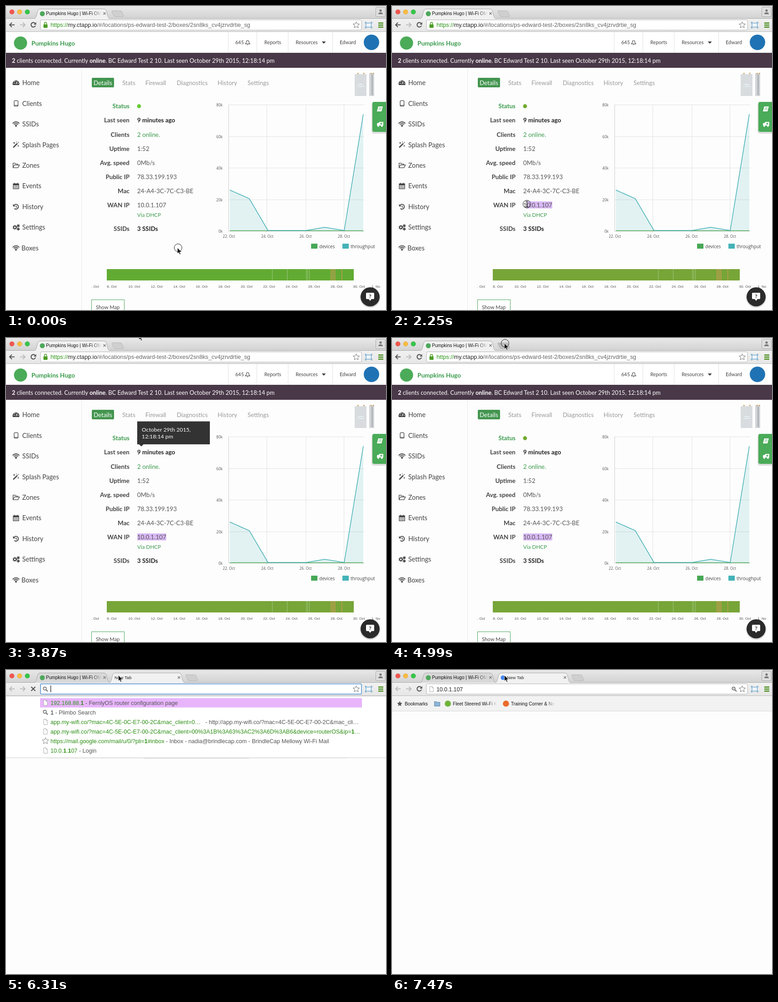
An HTML page that plays this animation: 837 px wide and 669 px high, repeating every 8000 ms.

```html
<!DOCTYPE html>
<html lang="en">
<head>
<meta charset="utf-8">
<title>Browser walkthrough</title>
<style>
  html, body { margin: 0; width: 100%; height: 100%; overflow: hidden; background: #fdfdfd; }
  svg { display: block; width: 837px; height: 669px; }
  text { font-family: Lato, sans-serif; white-space: pre; }
  .ui { font-family: "Liberation Sans", Arial, sans-serif; }
  .chart { font-family: "Open Sans", sans-serif; }
  .bold { font-weight: 700; }
  .end { text-anchor: end; }
  .mid { text-anchor: middle; }
</style>
</head>
<body>
<svg id="stage" viewBox="0 0 837 669"></svg>
<script>
const LOOP = 8000;
const stage = document.getElementById('stage');

// Drawing helpers
const text = (x, y, s, size, fill = '#444', cls = '') =>
  `<text x="${x}" y="${y}" font-size="${size}" fill="${fill}" class="${cls}">${s}</text>`;
const rect = (x, y, w, h, fill, more = '') =>
  `<rect x="${x}" y="${y}" width="${w}" height="${h}" fill="${fill}" ${more}/>`;
const disc = (x, y, r, fill, more = '') => `<circle cx="${x}" cy="${y}" r="${r}" fill="${fill}" ${more}/>`;
const line = (d, stroke, width = 1, fill = 'none') =>
  `<path d="${d}" stroke="${stroke}" stroke-width="${width}" fill="${fill}"/>`;
const shape = (d, fill) => `<path d="${d}" fill="${fill}"/>`;
const during = (span, content) => `<g data-on="${span}">${content}</g>`;
const move = (x, y, content) => `<g transform="translate(${x} ${y})">${content}</g>`;

let fades = 0;
const fadeText = (x, y, s, size, end) => {
  const id = 'fade' + fades++;
  return `<linearGradient id="${id}" gradientUnits="userSpaceOnUse" x1="${end - 20}" x2="${end}">
    <stop stop-color="#111"/><stop offset="1" stop-color="#111" stop-opacity="0"/></linearGradient>` +
    text(x, y, s, size, `url(#${id})`, 'ui');
};
const gradient = (id, top, bottom) => `<linearGradient id="${id}" x2="0" y2="1">
  <stop stop-color="${top}"/><stop offset="1" stop-color="${bottom}"/></linearGradient>`;

// Icons, centred on 0,0
const star = (r, fill, stroke) => {
  const pts = Array.from({ length: 10 }, (_, i) => {
    const a = i * Math.PI / 5, d = i % 2 ? r * .45 : r;
    return `${(d * Math.sin(a)).toFixed(2)} ${(-d * Math.cos(a)).toFixed(2)}`;
  });
  return line(`M${pts.join('L')}Z`, stroke, 1, fill);
};
const wifi = [3, 6, 9].map(r => line(`M${-r * .8} ${5 - r * .7}A${r} ${r} 0 0 1 ${r * .8} ${5 - r * .7}`, '#444', 1.8)).join('') + disc(0, 4.5, 1.6, '#444');
const gear = (x, y, r) => disc(x, y, r, 'none', 'stroke="#444" stroke-width="2"') +
  disc(x, y, r + 1.4, 'none', 'stroke="#444" stroke-width="1.5" stroke-dasharray="1.7 1.7"');
const doc = line('M-4 -6H1L4 -3V6H-4ZM1 -6V-3H4', '#aaa', 1, '#fff');
const glass = disc(-1.5, -1.2, 3.3, 'none', 'stroke="#666" stroke-width="1.5"') + line('M1 1.4L5 5', '#666', 2);
const close = line('M-2.5 -2.5L2.5 2.5M2.5 -2.5L-2.5 2.5', '#777', 1.3);
const icons = {
  gauge: shape('M-7 5A7.5 7.5 0 1 1 7 5Z', '#444') + line('M0 3L2.5 -3', '#fff', 1.4) +
    disc(-4, 1, 1, '#fff') + disc(-2.5, -3, 1, '#fff') + disc(4.5, 1, 1, '#fff'),
  tablet: rect(-4, -6, 8.5, 12, 'none', 'rx="1.5" stroke="#444" stroke-width="1.3"') + line('M-4 4H4', '#444'),
  wifi,
  wand: line('M-6 6L3 -3', '#444', 2.6) + line('M-4 -6V-2M-6 -4H-2M1 -7V-5M6 -6L4 -4M5 1V4M3.5 2.5H6.5', '#444', 1.1),
  folder: line('M-6.5 4V-5H-2L-.5 -3H4V-1M-6.5 5L-3.5 -1H7.5L4.5 5Z', '#444', 1.3),
  calendar: rect(-6, -5, 12, 11, 'none', 'stroke="#444" stroke-width="1.4"') +
    line('M-6 -3H6', '#444', 3) + line('M-6 2H6M-2 -2V6M2 -2V6', '#444', .9) + line('M-3 -7V-4M3 -7V-4', '#444', 1.8),
  history: line('M-4 -3.5A5.3 5.3 0 1 1 -3.5 4', '#444', 1.8) + shape('M-6.5 -6V-.8H-1.4Z', '#444') + line('M.3 -3V1H3', '#444', 1.3),
  gears: gear(-2.5, 0, 2.8) + gear(5, -3.5, 1.3) + gear(5, 3.7, 1.3)
};

// Browser frame
const tab = (x, fill) =>
  line(`M${x} 27.5q2.5 -.5 3.5 -4l3.5 -13q1.2 -4 5 -4H${x + 153}q3.8 0 5 4l3.5 13q1 3.5 3.5 4V50H${x}Z`, '#aaa', 1, fill);
const addButton = (x, fill) =>
  line(`M${x + 3} 10.5h17q3 0 4 3l3 8q0 2 -3 2h-15q-3 0 -4 -3l-4 -8q0 -2 2 -2Z`, '#b8b8b8', 1, fill);
const oldTab = fill => tab(63, fill) + disc(80, 17, 5.5, '#4fa85c') +
  fadeText(88, 20, 'Pumpkins Hugo | Wi-Fi OMD', 10.1, 210) + move(217, 16.5, close);
const arrowLeft = color => line('M19 41.5H8.5M13 36.5L8 41.5L13 46.5', color, 2);
const arrowRight = color => line('M31 41.5H41.5M37 36.5L42 41.5L37 46.5', color, 2);
const reload = line('M64 38A5 5 0 1 0 65 43', '#555', 2.1) + shape('M66.5 35.5V41H61Z', '#555');

const strip = rect(0, 0, 837, 28, 'url(#strip)') +
  [['#f0574f', '#dc4a42', 13], ['#fbbc40', '#e2a437', 30], ['#36c649', '#2bac3a', 47]]
    .map(([fill, rim, x]) => disc(x, 13, 5, fill, `stroke="${rim}" stroke-width=".8"`)).join('') +
  rect(814.5, 2.5, 21, 21, '#dedede', 'rx="2" stroke="#aaa"') + disc(825, 10, 2.6, '#777') + shape('M820 18q0 -4 5 -4t5 4Z', '#777') +
  line('M0 27.5H837', '#aaa');

const tabs = during('0-5260', oldTab('#f1f1f1') + addButton(232, '#cfcfcf') +
    during('4350-5260', addButton(232, '#e6e6e6')) + during('4990-5050', addButton(232, '#bdbdbd'))) +
  during('5260-8000', oldTab('#d8d8d8') + addButton(395, '#cfcfcf') +
    `<g id="newTab">${tab(228, '#f1f1f1')}${move(381, 16.5, close)}
    ${during('5260-7470', text(239, 20, 'New Tab', 9.7, '#222', 'ui'))}
    ${during('7470-8000', disc(244.5, 17, 5, '#4285f4') + text(253, 20, 'New Tab', 9.7, '#222', 'ui'))}</g>`);

const field = (stroke, width) => rect(76, 30.5, 707, 22.5, '#fff', `rx="2.5" stroke="${stroke}" stroke-width="${width}"`);
const address = (s, selectFrom, selectTo) => rect(selectFrom, 34, selectTo - selectFrom, 16, '#dcbafa') +
  move(87, 42, doc) + text(98, 46.5, s, 12.3, '#222', 'ui');
const toolbar = rect(0, 28, 837, 29, 'url(#toolbar)') + line('M0 56.5H837', '#b9b9b9') +
  during('0-5260', arrowLeft('#555') + arrowRight('#bbb') + reload + field('#b5b5b5', 1) +
    rect(82.5, 40.5, 9, 7.5, '#4a9c23', 'rx="1"') + line('M84.5 41V38.5a2.5 2.5 0 0 1 5 0V41', '#4a9c23', 1.5) +
    text(98, 46, '<tspan fill="#2c9417">https://</tspan><tspan fill="#222">my.ctapp.io</tspan>/#/locations/ps-edward-test-2/boxes/2sn8ks_cv4jzrvdrtie_sg', 12.75, '#666', 'ui')) +
  during('5260-8000', arrowLeft('#bbb') + arrowRight('#bbb')) +
  during('5260-7470', line('M55.5 37L64.5 46M64.5 37L55.5 46', '#555', 2.2)) +
  during('7470-8000', reload) +
  during('5260-7320', field('#76a8dc', 2)) +
  during('7320-8000', field('#b5b5b5', 1) + address('10.0.1.107', 0, 0) +
    move(754, 42, glass + line('M-3.2 -1.2H.2', '#666'))) +
  during('5260-6400', move(87, 42, glass)) +
  during('5260-5800', rect(98, 34, 1.2, 15, '#111')) + during('6100-6400', rect(98, 34, 1.2, 15, '#111')) +
  during('6400-6580', address('192.168.88.1', 104.8, 170)) +
  during('6580-7320', address('10.0.1.107', 111.7, 157)) +
  move(771.5, 42, star(7.5, '#fff', '#777')) +
  rect(793, 37.5, 11.5, 9, '#eef5fa', 'stroke="#5f9ecb" stroke-width="1.2"') +
  line('M791.5 38.5V35.5H794M803.5 35.5H806V38.5M806 45.5V48.5H803.5M794 48.5H791.5V45.5', '#5b93bd', 1.1) +
  line('M820 37.5H831M820 42H831M820 46.5H831', '#468c18', 2.4);

// Dashboard page
const menu = [['gauge', 'Home'], ['tablet', 'Clients'], ['wifi', 'SSIDs'], ['wand', 'Splash Pages'], ['folder', 'Zones'],
  ['calendar', 'Events'], ['history', 'History'], ['gears', 'Settings'], ['wifi', 'Boxes']]
  .map(([icon, label], i) => move(22, 169 + i * 45.45, icons[icon] + text(i === 8 ? 12 : 13.7, 5.2, label, 14.4))).join('');

const sections = rect(189, 158, 49, 21, '#43954f', 'rx="2"') +
  [[193, 'Details'], [256, 'Stats'], [307, 'Firewall'], [376, 'Diagnostics'], [466, 'History'], [532, 'Settings']]
    .map(([x, s], i) => text(x, 173.5, s, 13.4, i ? '#999' : '#fff')).join('');

const green = '#3a9a4c';
const details = [['Status', ''], ['Last seen', '9 minutes ago', '#222', 'bold'], ['Clients', '2 online.', green], ['Uptime', '1:52'],
  ['Avg. speed', '0Mb/s'], ['Public IP', '78.33.199.193'], ['Mac', '24-A4-3C-7C-C3-BE'], ['WAN IP', '10.0.1.107']]
  .map(([label, value, color = '#555', cls], i) => {
    const y = 225.3 + i * 31.1;
    return text(272, y, label, 13.5, i ? '#444' : green, 'end bold') + text(289, y, value, 13.4, color, cls);
  }).join('') + text(289, 463.5, 'Via DHCP', 11.7, green) +
  text(272, 495, 'SSIDs', 13.5, '#444', 'end bold') + text(289, 495, '3 SSIDs', 13.4, '#222', 'bold');

const curve = '493 405L536 424L577 494L661 494L702 487L745 494L787 238';
const chart = line('M490 217.5H789M490 287.5H789M490 356.5H789M490 426.5H789M574.5 217V495M660.5 217V495M744.5 217V495', '#e2e2e2') +
  line('M490.5 217V495.5H789M574.5 495V499M660.5 495V499M744.5 495V499', '#ccc') +
  `<path d="M${curve}V494H493Z" fill="#45b0b5" opacity=".14"/>` +
  line('M493 494.5H787', '#4fae5c', 1.4) + line('M' + curve, '#45b0b5', 1.5) +
  [80, 60, 40, 20, 0].map((n, i) => text(477, 221 + i * 69.5, n + 'k', 8.2, '#555', 'chart end')).join('') +
  [22, 24, 26, 28].map((n, i) => text(491 + i * 84.5, 510, n + '. Oct', 8.2, '#555', 'chart mid')).join('') +
  rect(672, 523, 14, 11, '#47a856') + text(690, 533, 'devices', 10, '#444', 'chart') +
  rect(741, 523, 14, 11, '#44b3b8') + text(759, 533, 'throughput', 10.1, '#444', 'chart');

const health = (span, dot, bar) => during(span, disc(293, 220.5, 4.4, dot) + rect(222, 579, 544, 25, bar));
const timeline = health('0-1540', '#66cc33', '#62ab33') + health('1540-8000', '#72aa2e', '#77a538') +
  [586, 619, 661, 664, 668].map(x => rect(x, 579, 1, 25, '#9cc77d')).join('') +
  [715, 718, 721, 724, 739].map(x => rect(x, 579, 1.4, 25, '#c99a55')).join('') +
  text(188, 620, '. Oct', 8, '#555', 'ui') + text(805, 620, '1. No', 8, '#555', 'ui') +
  Array.from({ length: 12 }, (_, i) => text(233 + i * 49.5, 620, 8 + 2 * i + '. Oct', 8, '#555', 'ui mid')).join('');

const header = rect(0, 57, 837, 46, '#fff') + disc(32, 81.5, 14.5, '#4bab58') +
  text(56, 87, 'Pumpkins Hugo', 13.6, green, 'bold') + line('M489.5 57V103M552.5 57V103M621.5 57V103M719.5 57V103', '#e0e0e0') +
  text(505, 84, '645', 10.9) + text(569, 84, 'Reports', 10.9) + text(638, 84, 'Resources', 10.9) + text(735, 84, 'Edward', 10.9) +
  line('M527.5 83.5q2 -1.5 2 -5q0 -2.5 2.7 -2.5t2.7 2.5q0 3.5 2 5ZM531 85.5h2.5', '#444', 1.1) +
  shape('M695.5 78H704.5L700 83Z', '#444') + disc(805, 80, 17, '#1f73b4') +
  rect(0, 103, 837, 33, '#493848') +
  text(13, 124.5, '<tspan class="bold">2</tspan> clients connected. Currently <tspan class="bold">online</tspan>. BC Edward Test 2 10. Last seen October 29th 2015, 12:18:14 pm', 12.8, '#fff');

const extras = rect(768, 150, 26, 48, '#d8dcdf') + shape('M773 178q8 -14 17 0Z', '#eef1f2') + line('M775 177q6 -5 12 0', '#9fc3cc') +
  rect(800, 148, 11, 50, '#d2d5d8') + rect(805, 151, 3, 45, '#aeb2b6') +
  [774, 787, 803, 808].map(x => rect(x, 147, 2.5, 3, '#c9a86a')).join('') +
  rect(805, 213, 36, 68, '#000', 'rx="5" opacity=".12"') + rect(807, 211, 34, 66, '#4aab58', 'rx="4"') +
  shape('M820 221H830L827 232H817Z', '#fff') + line('M821.5 224H827.5M820.5 227H826.5', '#4aab58') +
  rect(822, 255, 9, 8, '#fff') + shape('M817 263V259L819 257H822V263Z', '#fff') + disc(820, 264, 2, '#fff') + disc(828, 264, 2, '#fff') +
  line('M826.5 256.5V261.5M824 259H829', '#4aab58', 1.4) +
  rect(188.5, 646.5, 72, 40, '#fff', 'stroke="#4aa55a"') + text(198, 667, 'Show Map', 11.3) +
  disc(802, 642, 22, '#000', 'opacity=".15"') + disc(802, 640, 21, '#2b2b2b') +
  shape('M795 631H809q2 0 2 2V643q0 2 -2 2H805L802 649L799 645H795q-2 0 -2 -2V633q0 -2 2 -2Z', '#fff') +
  text(802, 642.5, '?', 12, '#2b2b2b', 'mid bold');

const tooltip = rect(289, 183.5, 160, 50.5, '#333') + shape('M293 234H303L298 238.5Z', '#333') +
  text(299, 206, 'October 29th 2015,', 12.3, '#fff') + text(299, 220.5, '12:18:14 pm', 12.3, '#fff');

const page = rect(0, 57, 837, 612, '#fdfdfd') + header + line('M166.5 136V669', '#e9e9e9') +
  '<rect id="selection" y="430" height="15.5" fill="#d9b9f6"/>' +
  menu + sections + timeline + details + chart + extras + during('3870-4200', tooltip);

// New tab page
const bookmarks = rect(0, 57, 837, 33, '#f2f2f2') + line('M0 90.5H837', '#dadada') +
  move(17, 74.5, star(5.2, '#555', '#555')) + text(28, 77.5, 'Bookmarks', 10.2, '#111', 'ui') +
  line('M93.5 69.5H98L99.5 71H105.5V79.5H93.5Z', '#5b87ad', 1, '#8fb5d6') +
  disc(123, 74, 6.8, '#6fb33a') + fadeText(134, 77.5, 'Fleet Steered Wi-Fi Kit', 10.2, 231) +
  disc(251, 74, 6.8, '#ea6a2c') + fadeText(262, 77.5, 'Training Corner &amp; Notes', 10.2, 359);

const bold = s => s.replace(/&/g, '&amp;').replace(/\*(.+?)\*/g, '<tspan class="bold">$1</tspan>');
const suggestion = ([icon, url, title], i) => move(87, 72 + i * 21.05, icon +
  text(11, 4.5, `<tspan fill="#2c8f14">${bold(url)}</tspan>${bold(title)}`, 12.55, '#555', 'ui'));
const app = 'app.my-wifi.co/?mac=4C-5E-0C-E7-00-2C&mac_client=0';
const outline = star(7.5, '#fff', '#888');
const router = [doc, '192.168.88.*1*', ' - FernlyOS router configuration page'];
const login = [doc, '10.0.*1*.*1*07', ' - Login'];
const client = [doc, app + '…', '\u00a0\u00a0 - http://app.my-wifi.co/?mac=4C-5E-0C-E7-00-2C&mac_cli…'];
const device = [doc, app + '0%3A1B%3A63%3AC2%3A6D%3AB6&device=routerOS&ip=*1*…', ''];
const mail = [outline, 'https://mail.google.com/mail/u/0/?pli=*1*#inbox', ' - Inbox - nadia@brindlecap.com - BrindleCap Mellowy Wi-Fi Mail'];
const search = s => [glass, '', `<tspan fill="#222">${s}</tspan> - Plimbo Search`];
const list = (span, rows) => during(span, rows.map(suggestion).join(''));
const typed = [doc, '*10*.0.1.107', ' - Login'];
const nearby = [doc, '*10*.0.0.1', ' - Login'];

const dropdown = rect(0, 57, 837, 136, '#fff') + line('M0 57.5H837', '#d4d4d4') +
  line('M0 193H837', '#dcdcdc', 1.5) + line('M90 194.5H750', '#ececec') + line('M303 194.5H535', '#d2d2d2') +
  rect(75, 62, 709, 20.5, '#e8b5fc') +
  list('6310-6580', [router, search('1'), client, device, mail, login]) +
  list('6580-6750', [typed, search('10'), client, mail, router, nearby]) +
  list('6750-7140', [typed, search('10'), client, router, mail, nearby]);

const blank = rect(0, 57, 837, 612, '#fdfdfd') + bookmarks + during('6310-7140', dropdown);

const pointer = `<g id="cursor">
  <path id="arrow" d="M-1.5 0V13L1.5 10.3L3.6 15L5.8 14L3.8 9.5H8Z" fill="#111" stroke="#fff" stroke-width=".8"/>
  <path id="beam" d="M-3 -6.5Q0 -6.5 0 -4.5Q0 -6.5 3 -6.5M0 -4.5V4.5M-3 6.5Q0 6.5 0 4.5Q0 6.5 3 6.5M-1.5 1.5H1.5" fill="none" stroke="#222" stroke-width="1.2"/>
  ${['0-90', '1370-2970', '4990-5050'].map(s => during(s, disc(0, 0, 8.5, 'none', 'stroke="#222"'))).join('')}</g>`;

stage.innerHTML = gradient('strip', '#e8e8e8', '#d2d2d2') + gradient('toolbar', '#f1f1f1', '#e6e6e6') +
  strip + tabs + toolbar + during('0-5260', page) + during('5260-8000', blank) + pointer;

// Motion: [time, x, y]
const path = [
  [0, 379, 532], [390, 378, 527], [480, 373, 505], [570, 364, 476], [660, 357, 457], [740, 352, 445], [830, 349, 439], [920, 348, 436],
  [1540, 340, 436], [1620, 329, 436], [1830, 321, 436], [1920, 312, 436], [2010, 304, 436], [2100, 298, 436],
  ...Array.from({ length: 8 }, (_, i) => [2250 + i * 77, 297 - i * 8 / 7, 436 + i * 3 / 7]),
  [3570, 291, 365], [3660, 294, 252], [3870, 294, -9], [3990, 290, -30],
  [4200, 266, -8], [4290, 257, 3], [4350, 251, 8], [4440, 249, 9.5], [4610, 249, 10.5], [4700, 249, 11.5]];
const tabDrop = [[0, 11], [5320, 4], [5500, 0]];
const at = (steps, t) => steps.findLast(s => s[0] <= t).slice(1);

// Caret stops inside the selectable address
const stops = [289];
for (const ch of '10.0.1.107') stops.push(stops.at(-1) + (ch === '.' ? 3.2 : 7.77));

const byId = id => document.getElementById(id);
const [cursor, arrow, beam, selection, newTab] = ['cursor', 'arrow', 'beam', 'selection', 'newTab'].map(byId);
const timed = [...stage.querySelectorAll('[data-on]')].map(el => [el, ...el.dataset.on.split('-').map(Number)]);
const show = (el, on) => el.setAttribute('display', on ? 'inline' : 'none');

function render(t) {
  for (const [el, from, to] of timed) show(el, t >= from && t < to);
  const [x, y] = at(path, t);
  cursor.setAttribute('transform', `translate(${x} ${y})`);
  const overText = t >= 740 && t < 3570;
  show(beam, overText);
  show(arrow, !overText);

  const dragX = t < 2790 ? x : stops[0];
  const left = stops.reduce((a, b) => Math.abs(b - dragX) < Math.abs(a - dragX) ? b : a);
  selection.setAttribute('x', left);
  selection.setAttribute('width', stops.at(-1) - left);
  show(selection, t >= 1540);
  newTab.setAttribute('transform', `translate(0 ${at(tabDrop, t)[0]})`);
}

const start = performance.now();
function tick() {
  render((performance.now() - start) % LOOP);
  requestAnimationFrame(tick);
}
tick();
</script>
</body>
</html>
```
